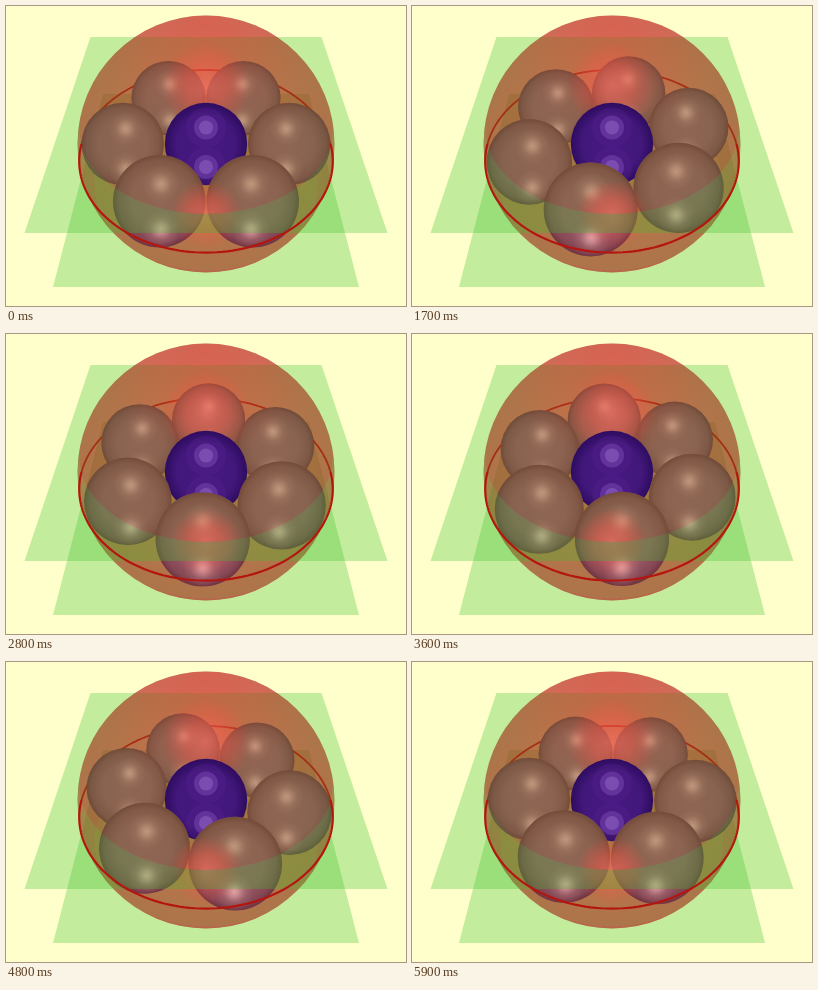
These frames come from a looping animation (400 by 300 pixels, 6000 ms). An HTML page with a canvas:

```html
<!DOCTYPE html>
<html>
<head>
<meta charset="utf-8">
<title>Spheres in a sphere</title>
<style>
  html, body { margin: 0; height: 100%; overflow: hidden; background: #ffffcc; }
  canvas { display: block; }
</style>
</head>
<body>
<canvas id="stage" width="400" height="300"></canvas>
<script>
const ctx = document.getElementById('stage').getContext('2d');
const CX = 200, CY = 138, BIG = 128.5, RADIUS = 41.2, ORBIT = 83.2, RING = 124.5;
const DISTANCE = 465, TILT = Math.SQRT1_2, TAU = Math.PI * 2;

// Perspective view of a point on a horizontal circle, camera 45 degrees above
function project(radius, angle) {
  const depth = radius * Math.cos(angle) * TILT;
  const scale = DISTANCE / (DISTANCE - depth);
  return { x: CX + radius * Math.sin(angle) * scale, y: CY + depth * scale, scale, depth };
}

function radial(x, y, r, ...stops) {
  const g = ctx.createRadialGradient(x, y, 0, x, y, r);
  stops.forEach(([at, color]) => g.addColorStop(at, color));
  return g;
}

function disc(x, y, r, fill) {
  ctx.beginPath();
  ctx.arc(x, y, r, 0, TAU);
  ctx.fillStyle = fill;
  ctx.fill();
}

function clipped(path, rule, draw) {
  ctx.save();
  ctx.clip(path, rule);
  draw();
  ctx.restore();
}

function circlePath(x, y, r) {
  const path = new Path2D();
  path.arc(x, y, r, 0, TAU);
  return path;
}

function outside(inner) {
  const path = new Path2D();
  path.rect(0, 0, 400, 300);
  path.addPath(inner);
  return path;
}

function plane(backY, backHalf, frontY, frontHalf) {
  ctx.beginPath();
  ctx.moveTo(CX - backHalf, backY);
  ctx.lineTo(CX + backHalf, backY);
  ctx.lineTo(CX + frontHalf, frontY);
  ctx.lineTo(CX - frontHalf, frontY);
  ctx.fillStyle = 'rgba(61,193,47,.305)';
  ctx.fill();
}

function ringArc(from, to, width, color) {
  ctx.beginPath();
  for (let i = 0; i <= 90; i++) {
    const p = project(RING, from + (to - from) * i / 90);
    ctx.lineTo(p.x, p.y);
  }
  ctx.lineWidth = width;
  ctx.strokeStyle = color;
  ctx.stroke();
}

// Parts of the big sphere above the upper plane and below the lower one
const cap = new Path2D();
cap.arc(CX, CY, BIG, Math.PI + 0.117, -0.117);
cap.ellipse(CX, 123, 127, 85, 0, 0, Math.PI);
const base = new Path2D();
base.ellipse(CX, 179.5, 111, 84.5, 0, 0, TAU);

const redShade = radial(CX, CY, BIG,
  [0, 'rgba(190,28,25,.4)'], [.6, 'rgba(195,30,27,.4)'], [1, 'rgba(172,30,25,.4)']);
const topGlow = radial(CX, 15, 110, [0, 'rgba(255,50,50,.2)'], [1, 'rgba(255,50,50,0)']);

function shell() {
  disc(CX, CY, BIG, redShade);
}

function glow(y, r, strength) {
  disc(CX, y, r, radial(CX, y, r,
    [0, `rgba(255,112,102,${strength})`], [.45, `rgba(255,90,80,${strength * .7})`],
    [1, 'rgba(255,70,60,0)']));
}

function greyBall({ x, y, scale }) {
  const r = RADIUS * scale;
  disc(x, y, r, radial(x, y, r,
    [0, '#82829a'], [.6, '#7c7c92'], [.88, '#62627a'], [1, '#42425a']));
  for (const offset of [-.37, .6]) {
    const hx = x - (x - CX) * .035, hy = y + offset * r, hr = r * .42;
    clipped(circlePath(x, y, r), 'nonzero', () => disc(hx, hy, hr, radial(hx, hy, hr,
      [0, 'rgba(255,255,255,.95)'], [.25, 'rgba(245,245,250,.7)'],
      [.6, 'rgba(210,210,220,.25)'], [1, 'rgba(190,190,205,0)'])));
  }
}

function blueBall() {
  disc(CX, CY, RADIUS, radial(CX, CY, RADIUS,
    [0, '#451880'], [.7, '#43187c'], [1, '#2e0c60']));
  clipped(circlePath(CX, CY, RADIUS), 'nonzero', () => {
    for (const y of [121.5, 161]) {
      disc(CX, y, 20, 'rgba(110,50,160,.15)');
      disc(CX, y, 12, 'rgba(125,75,180,.5)');
      disc(CX, y, 7, 'rgba(150,105,200,.5)');
    }
  });
}

function draw(degrees) {
  const balls = Array.from({ length: 6 }, (_, i) =>
    project(ORBIT, (degrees - 30 + i * 60) * TAU / 360)).sort((a, b) => a.depth - b.depth);

  ctx.fillStyle = '#ffffcc';
  ctx.fillRect(0, 0, 400, 300);

  clipped(base, 'nonzero', shell);
  plane(88, 103, 281, 153);
  clipped(outside(base), 'evenodd', shell);
  ringArc(Math.PI / 2, Math.PI * 1.5, 1.8, '#c00000');
  balls.forEach(greyBall);

  clipped(outside(cap), 'evenodd', () => { shell(); glow(210, 34, .45); });
  plane(31, 115.5, 227, 181.5);
  clipped(cap, 'nonzero', () => {
    shell();
    disc(CX, CY, BIG, topGlow);
    glow(80, 44, .6);
    glow(210, 36, .65);
  });

  // The blue ball shows except where nearer balls cover it
  ctx.save();
  for (const b of balls.filter(b => b.depth > 0.01)) {
    ctx.clip(outside(circlePath(b.x, b.y, RADIUS * b.scale)), 'evenodd');
  }
  blueBall();
  ctx.restore();

  ringArc(-Math.PI / 2, Math.PI / 2, 2.2, '#b4160f');
}

// One degree per tenth of a second; sixty degrees close the loop
function frame() {
  draw(Math.floor(performance.now() / 100) % 60);
  requestAnimationFrame(frame);
}
frame();
</script>
</body>
</html>
```
